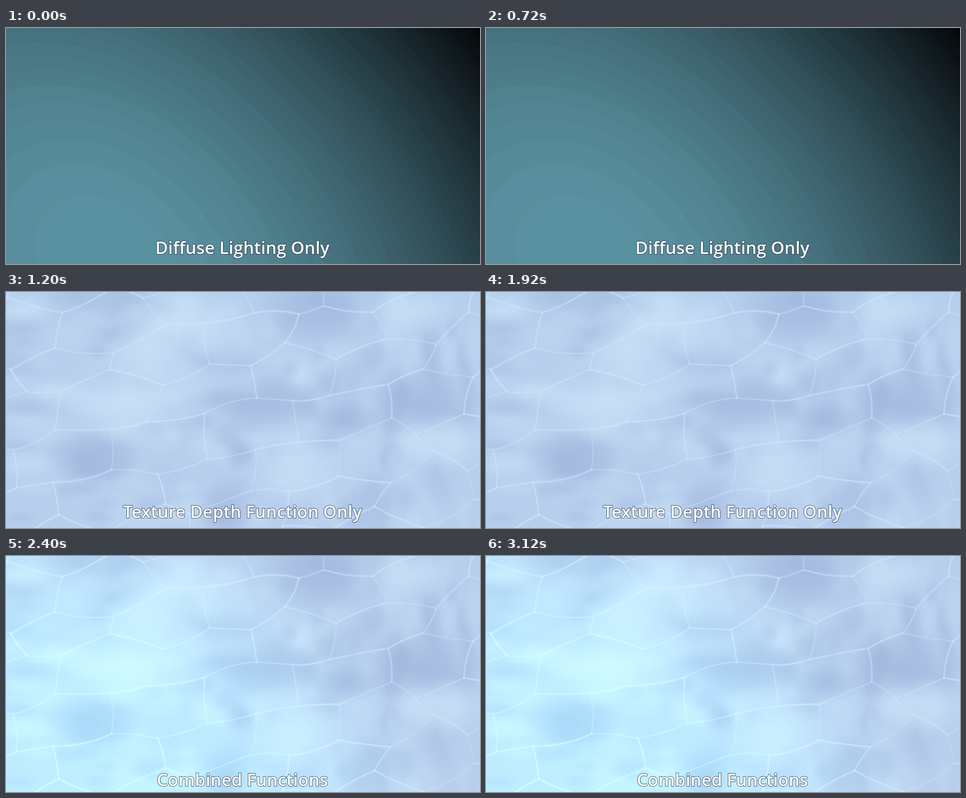
These frames come from a looping animation (800 by 400 pixels, 3.6 s). An HTML page with a canvas:

```html
<!DOCTYPE html>
<html lang="en">
<head>
<meta charset="utf-8">
<title>Water lighting</title>
<style>
html, body { margin: 0; overflow: hidden; }
canvas { display: block; }
</style>
</head>
<body>
<canvas id="stage" width="800" height="400"></canvas>
<script>
const ctx = document.getElementById('stage').getContext('2d');
const SCENE_MS = 1200;
const SHADE = '158,181,220';
const GLOW = '204,228,249';

// Main areas of the water: x, y, radius
const SHADOWS = [[700, 186, 75], [440, 195, 62], [145, 280, 55], [535, 25, 80], [575, 215, 40]];
const GLOWS = [[205, 190, 75], [240, 100, 55], [300, 50, 80], [690, 30, 50], [500, 310, 65], [740, 255, 55]];

function seeded(seed) {
  return () => (seed = seed * 16807 % 2147483647) / 2147483647;
}

// Tilted elliptical frame of the light spot
function inLight(draw) {
  ctx.save();
  ctx.translate(175, 410);
  ctx.rotate(Math.PI / 4);
  ctx.scale(1.219, 0.868);
  draw();
  ctx.restore();
}

function drawDiffuse() {
  const levels = 44;
  ctx.fillStyle = '#020a0c';
  ctx.fillRect(0, 0, 800, 400);
  inLight(() => {
    for (let i = 1; i < levels; i++) {
      const k = (i + 0.5) / levels;
      ctx.fillStyle = `rgb(${91 * k},${147 * k},${160 * k + 2})`;
      ctx.beginPath();
      ctx.arc(0, 0, 560 * Math.acos(i / levels), 0, Math.PI * 2);
      ctx.fill();
    }
  });
}

function patch(x, y, rx, ry, rgb, alpha) {
  const g = ctx.createRadialGradient(0, 0, 0, 0, 0, 1.5);
  g.addColorStop(0, `rgba(${rgb},${alpha})`);
  g.addColorStop(0.4, `rgba(${rgb},${alpha * 0.75})`);
  g.addColorStop(1, `rgba(${rgb},0)`);
  ctx.save();
  ctx.translate(x, y);
  ctx.scale(rx, ry);
  ctx.fillStyle = g;
  ctx.fillRect(-1.5, -1.5, 3, 3);
  ctx.restore();
}

// Small ripples lie flat on the left and stand upright on the right
function drawRipples(random) {
  for (let i = 0; i < 220; i++) {
    const x = random() * 800, y = random() * 400;
    const size = 12 + 22 * random();
    const stretch = 1.6 - x / 800;
    patch(x, y, size * stretch, size / stretch, i % 2 ? GLOW : SHADE, 0.3);
  }
}

// A jittered, sheared honeycomb of fine bent strands
function drawNet(random) {
  const cols = 13, rows = 9, step = 76;
  const nodes = [];
  for (let row = 0; row < rows; row++) {
    for (let col = 0; col < cols; col++) {
      const x = (col - 0.7) * step + (random() - 0.5) * 44;
      const zigzag = (row + col) % 2 ? 12 : -12;
      const y = (row - 1) * step + zigzag - 0.16 * (x - 200) + (random() - 0.5) * 30;
      nodes.push([x, y]);
    }
  }
  const strand = ([x1, y1], [x2, y2]) => {
    const bend = (random() - 0.5) * 0.25;
    const strength = 0.5 + random() * 0.5;
    ctx.beginPath();
    ctx.moveTo(x1, y1);
    ctx.quadraticCurveTo((x1 + x2) / 2 + (y2 - y1) * bend, (y1 + y2) / 2 - (x2 - x1) * bend, x2, y2);
    for (const [width, alpha] of [[4.5, 0.18], [1.8, 0.55]]) {
      ctx.lineWidth = width * (0.5 + strength / 2);
      ctx.strokeStyle = `rgba(212,233,252,${alpha * strength})`;
      ctx.stroke();
    }
  };
  ctx.lineCap = 'round';
  nodes.forEach((node, i) => {
    const col = i % cols, row = Math.floor(i / cols);
    if (col < cols - 1) strand(node, nodes[i + 1]);
    if (row < rows - 1 && (row + col) % 2) strand(node, nodes[i + cols]);
  });
}

function drawTexture() {
  const random = seeded(2024);
  ctx.fillStyle = '#b7ceed';
  ctx.fillRect(0, 0, 800, 400);
  drawRipples(random);
  SHADOWS.forEach(([x, y, r]) => patch(x, y, r, r * 0.6, SHADE, 0.75));
  GLOWS.forEach(([x, y, r]) => patch(x, y, r, r * 0.6, GLOW, 0.75));
  drawNet(random);
}

function drawCombined() {
  drawTexture();
  const g = ctx.createRadialGradient(0, 0, 0, 0, 0, 570);
  g.addColorStop(0, 'rgb(8,34,28)');
  g.addColorStop(0.45, 'rgb(7,27,22)');
  g.addColorStop(1, '#000');
  inLight(() => {
    ctx.globalCompositeOperation = 'lighter';
    ctx.fillStyle = g;
    ctx.fillRect(-570, -570, 1140, 1140);
  });
}

// Captions rest on a common bottom edge, descenders included
function caption(text) {
  ctx.font = '600 29.2px "Open Sans", "Noto Sans", sans-serif';
  ctx.textAlign = 'center';
  ctx.lineJoin = 'round';
  ctx.lineWidth = 2;
  ctx.strokeStyle = 'rgba(35,48,68,.65)';
  ctx.fillStyle = '#fff';
  const y = Math.round(389.5 - ctx.measureText(text).actualBoundingBoxDescent);
  ctx.strokeText(text, 399, y);
  ctx.fillText(text, 399, y);
}

const scenes = [
  [drawDiffuse, 'Diffuse Lighting Only'],
  [drawTexture, 'Texture Depth Function Only'],
  [drawCombined, 'Combined Functions']
];
let shown = -1;

function frame() {
  const index = Math.floor(performance.now() / SCENE_MS) % scenes.length;
  if (index !== shown) {
    const [draw, text] = scenes[index];
    draw();
    caption(text);
    shown = index;
  }
  requestAnimationFrame(frame);
}
frame();
</script>
</body>
</html>
```
